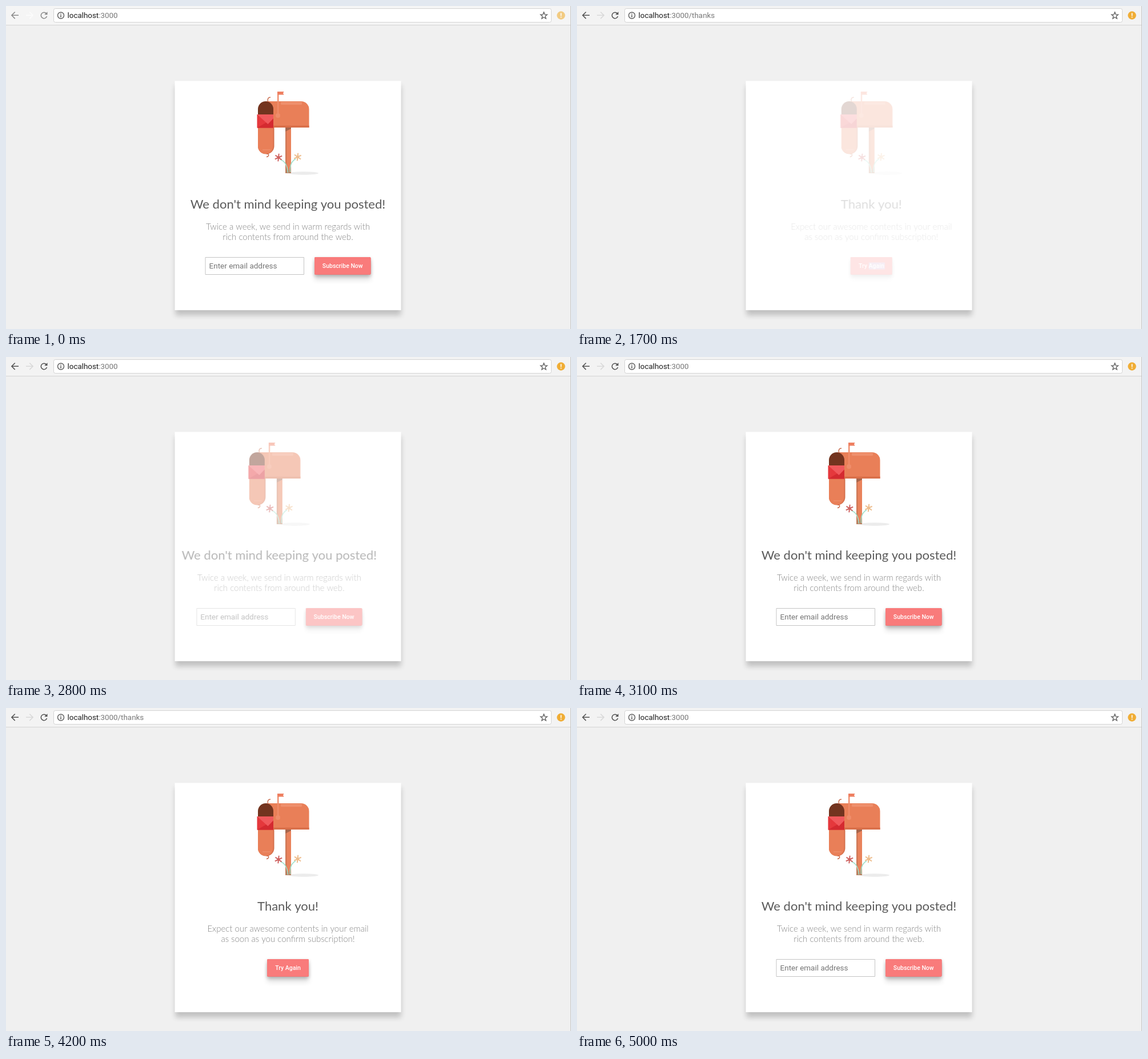
An HTML page with a canvas for the animation above (5.1 s loop, 989 px wide and 566 px high).

```html
<!DOCTYPE html>
<html lang="en">
<head>
<meta charset="utf-8">
<title>Subscribe card</title>
<style>
  html, body { margin: 0; width: 989px; height: 566px; overflow: hidden; background: #f0f0f0; }
  canvas { display: block; }
</style>
</head>
<body>
<canvas id="stage" width="989" height="566"></canvas>
<script>
const W = 989, H = 566, LOOP = 5100, STEP = 100;
const CLICKS = [1380, 2462, 3210, 4400];
const SLIDE_MS = 250, SLIDE_PX = 27, FOCUS_AT = 1000, CENTER = 493.5;
const stage = document.getElementById('stage').getContext('2d');

// cubic-bezier(.55, 0, .1, 1)
function ease(x) {
  let lo = 0, hi = 1;
  for (let i = 0; i < 24; i++) {
    const u = (lo + hi) / 2, v = 1 - u;
    if (1.65 * v * v * u + 0.3 * v * u * u + u * u * u < x) lo = u; else hi = u;
  }
  return 3 * (1 - lo) * lo * lo + lo * lo * lo;
}

function box(c, x, y, w, h, radius, fill, stroke) {
  c.beginPath();
  c.roundRect(x, y, w, h, radius);
  if (fill) { c.fillStyle = fill; c.fill(); }
  if (stroke) { c.strokeStyle = stroke; c.lineWidth = 1; c.stroke(); }
}

function shadowBox(c, x, y, w, h, radius, fill, dy, blur, alpha) {
  c.save();
  c.shadowColor = `rgba(0,0,0,${alpha})`;
  c.shadowOffsetY = dy;
  c.shadowBlur = blur;
  box(c, x, y, w, h, radius, fill);
  c.restore();
}

function shape(c, path, fill, stroke, width = 1) {
  const p = new Path2D(path);
  if (fill) { c.fillStyle = fill; c.fill(p); }
  if (stroke) { c.strokeStyle = stroke; c.lineWidth = width; c.stroke(p); }
}

function disc(c, x, y, rx, ry, fill, stroke, width) {
  c.beginPath();
  c.ellipse(x, y, rx, ry, 0, 0, 7);
  if (fill) { c.fillStyle = fill; c.fill(); }
  if (stroke) { c.strokeStyle = stroke; c.lineWidth = width; c.stroke(); }
}

function label(c, str, x, y, font, color, align = 'center') {
  c.font = font;
  c.fillStyle = color;
  c.textAlign = align;
  c.fillText(str, x, y);
}

function flower(c, x, y, color) {
  c.strokeStyle = color;
  c.lineWidth = 2;
  c.beginPath();
  for (let i = 0; i < 6; i++) {
    const a = (i + 0.5) * Math.PI / 3 + 0.1;
    c.moveTo(x, y);
    c.lineTo(x + 6.8 * Math.cos(a), y + 6.8 * Math.sin(a));
  }
  c.stroke();
  disc(c, x, y, 2.4, 2.4, color);
}

function mailbox(c) {
  disc(c, 521, 293, 26, 2.8, '#ececec');
  // post
  box(c, 489, 213, 10, 80, 0, '#e9835c');
  box(c, 489, 213, 2.5, 80, 0, '#cf7a58');
  shape(c, 'M489 213H499V215L489 220Z', '#a8664c');
  shape(c, 'M489 293L490 280L494 289L498 280L499 293Z', '#b9805f');
  shape(c, 'M480 269Q492 273 493.5 292M507 268Q496 274 497.5 291', null, '#9fdfc9', 1.6);
  flower(c, 477, 265.5, '#cf6260');
  flower(c, 510.5, 264.5, '#edbd8d');
  // hooks
  shape(c, 'M463 160Q457 160 458.5 167M456 259Q461 259 459.5 262Q459 264 456 264.5', null, '#c9694a', 1.4);
  // body
  box(c, 454, 167, 76.5, 46, [0, 14, 0, 0], '#e97f58');
  box(c, 481, 168, 37, 5, 1, '#ee8f6c');
  box(c, 468, 209.5, 62.5, 3.5, 0, '#d96f49');
  // opening, lowered door, letter
  box(c, 441, 167, 27, 46, [13.5, 13.5, 0, 0], '#73341f');
  box(c, 441, 213, 28.5, 46.5, [0, 0, 14, 14], '#d4704c');
  box(c, 441, 213, 26.5, 46, [0, 0, 13, 13], '#e97f58');
  shape(c, 'M449 252H463', null, '#ee8f6c', 1.5);
  box(c, 439.5, 190, 28.5, 23.5, 0, '#e5383c');
  shape(c, 'M439.5 213.5L468 197V213.5Z', '#d42a30');
  shape(c, 'M439.5 190H468V197L458.5 207Z', '#f0595c');
  // flag
  box(c, 475, 150, 2.4, 42, 0, '#ef8d6b');
  shape(c, 'M475 150H486.5L485 152.7L486.5 155.5H475Z', '#ee7f60');
  disc(c, 476, 192, 4, 4, '#ef8d6b');
}

function button(c, x, w, str) {
  shadowBox(c, x, 440, w, 30.7, 2, '#f97b7b', 10, 8, 0.1);
  shadowBox(c, x, 440, w, 30.7, 2, '#f97b7b', 3, 6, 0.27);
  label(c, str, x + w / 2, 459, '500 10.5px Roboto, sans-serif', '#fff');
}

function copy(c, title, lines) {
  label(c, title, CENTER, 355, '22px Lato, sans-serif', '#5a5a5a');
  lines.forEach((line, i) =>
    label(c, line, CENTER, 392.3 + 17.6 * i, '300 15px Lato, sans-serif', '#858585'));
}

function homePage(c) {
  mailbox(c);
  copy(c, "We don't mind keeping you posted!",
    ['Twice a week, we send in warm regards with', 'rich contents from around the web.']);
  box(c, 349, 440.5, 172.5, 30, 0, '#fff', '#c4c4c4');
  label(c, 'Enter email address', 355.5, 460, '13.5px Roboto, sans-serif', '#757575', 'left');
  button(c, 540, 98.5, 'Subscribe Now');
}

function thanksPage(c, selected) {
  mailbox(c);
  copy(c, 'Thank you!',
    ['Expect our awesome contents in your email', 'as soon as you confirm subscription!']);
  button(c, 457, 73, 'Try Again');
  if (selected) {
    box(c, 489, 449.5, 28, 12, 0, '#cfa9c9');
    label(c, 'Again', 516, 459, '500 10.5px Roboto, sans-serif', '#fff', 'right');
  }
}

function layer(paint) {
  const cv = document.createElement('canvas');
  cv.width = W;
  cv.height = H;
  paint(cv.getContext('2d'));
  return cv;
}

function toolbar(c, onThanks, active) {
  const ink = active ? '#555' : '#8c8c8c';
  box(c, 0, 0, W, 33, 0, active ? '#f3f3f3' : '#f5f5f5');
  box(c, 0, 33, W, 1, 0, '#d4d4d4');
  box(c, 83.5, 4.5, 871, 24, 3, '#fff', '#d3d3d3');
  shape(c, 'M22 16.3H10M15.7 10.5L9.9 16.3L15.7 22.1', null, ink, 1.6);
  shape(c, 'M35 16.3H47M41.3 10.5L47.1 16.3L41.3 22.1', null, active ? '#d9d9d9' : '#fcfcfc', 1.6);
  c.beginPath();
  c.arc(66.5, 16.5, 5.2, 0.3, 5.5);
  c.strokeStyle = ink;
  c.lineWidth = 1.6;
  c.stroke();
  shape(c, 'M72.5 10V15.3H67.2Z', ink);
  disc(c, 96, 16.5, 5.5, 5.5, null, '#5a5a5a', 1.4);
  box(c, 95.2, 13.2, 1.6, 1.6, 0, '#5a5a5a');
  box(c, 95.2, 15.8, 1.6, 4, 0, '#5a5a5a');

  const font = '13.4px Roboto, sans-serif';
  label(c, 'localhost', 107.5, 21.3, font, '#1c1c1c', 'left');
  const end = 107.5 + c.measureText('localhost').width;
  label(c, onThanks ? ':3000/thanks' : ':3000', end, 21.3, font, '#777', 'left');

  c.beginPath();
  for (let i = 0; i < 10; i++) {
    const a = i * Math.PI / 5 - Math.PI / 2, r = i % 2 ? 2.7 : 6.2;
    c.lineTo(941.5 + r * Math.cos(a), 17 + r * Math.sin(a));
  }
  c.closePath();
  c.strokeStyle = '#5a5a5a';
  c.lineWidth = 1.3;
  c.stroke();
  disc(c, 971.5, 16.5, 7.2, 7.2, active ? '#f0ad35' : '#f2cb82');
  box(c, 970.7, 12.3, 1.7, 5.2, 0, '#fff');
  box(c, 970.7, 18.8, 1.7, 1.7, 0, '#fff');
}

const home = layer(homePage);
const thanks = layer(c => thanksPage(c, false));
const thanksSelected = layer(c => thanksPage(c, true));

function pose(t) {
  const count = CLICKS.filter(click => t >= click).length;
  const onThanks = count % 2 === 1;
  const state = { onThanks, shown: onThanks, alpha: 1, dx: 0, count };
  if (!count) return state;
  const age = t - CLICKS[count - 1], side = onThanks ? 1 : -1;
  if (age < SLIDE_MS) {
    const p = ease(age / SLIDE_MS);
    Object.assign(state, { shown: !onThanks, alpha: 1 - p, dx: -side * SLIDE_PX * p });
  } else if (age < 2 * SLIDE_MS) {
    const p = ease(age / SLIDE_MS - 1);
    Object.assign(state, { alpha: p, dx: side * SLIDE_PX * (1 - p) });
  }
  return state;
}

function draw(t) {
  const s = pose(t), active = t >= FOCUS_AT;
  box(stage, 0, 0, W, H, 0, '#f0f0f0');
  toolbar(stage, s.onThanks, active);
  shadowBox(stage, 295.5, 131.3, 396, 401.7, 0, '#fff', 9, 9, 0.2);
  box(stage, 988, 0, 1, H, 0, '#c6c6c6');
  stage.globalAlpha = s.alpha;
  stage.drawImage(!s.shown ? home : s.count < 3 ? thanksSelected : thanks, s.dx, 0);
  stage.globalAlpha = 1;
}

const start = performance.now();
function tick() {
  const t = (performance.now() - start) % LOOP;
  draw(Math.floor(t / STEP) * STEP);
  requestAnimationFrame(tick);
}
tick();
</script>
</body>
</html>
```
